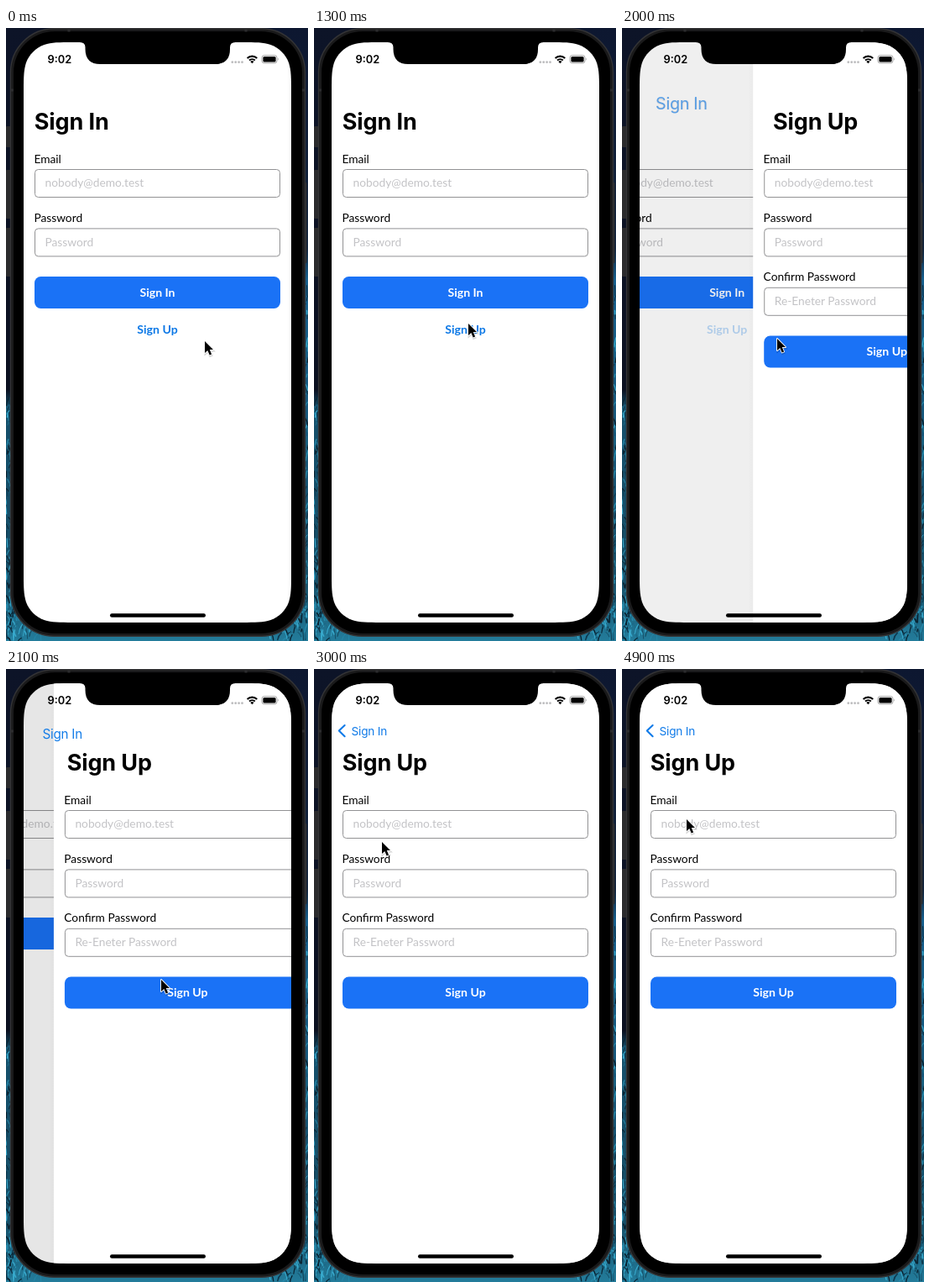
An HTML page for the animation above (5000 ms loop, 360 by 730 pixels).

```html
<!DOCTYPE html>
<html lang="en">
<head>
<meta charset="utf-8">
<title>Sign in flow</title>
<style>
  html, body { margin: 0; width: 100%; height: 100%; overflow: hidden; background: #0b1220; }
  svg { display: block; width: 100%; height: 100%; }
  .label, .hint { font: 400 13.75px Lato, sans-serif; }
  .hint { fill: #c3c3c6; }
  .action { font: 700 14.1px Lato, sans-serif; text-anchor: middle; }
  .title { font: 700 27px Inter, sans-serif; letter-spacing: -.12px; }
  .back { font: 400 13.6px Inter, sans-serif; letter-spacing: -.2px; fill: #0f7ae8; }
  .clock { font: 600 12.8px Inter, sans-serif; }
</style>
</head>
<body>
<svg viewBox="0 0 360 730">
  <defs>
    <linearGradient id="leftSky" x2="0" y2="1">
      <stop offset="0" stop-color="#0d1428"/>
      <stop offset=".59" stop-color="#0b1020"/>
      <stop offset=".62" stop-color="#154f6b"/>
      <stop offset=".9" stop-color="#164f68"/>
      <stop offset="1" stop-color="#237c9b"/>
    </linearGradient>
    <linearGradient id="rightSky" x2="0" y2="1">
      <stop offset="0" stop-color="#0d1730"/>
      <stop offset=".36" stop-color="#10243f"/>
      <stop offset=".41" stop-color="#16608f"/>
      <stop offset=".9" stop-color="#164f68"/>
      <stop offset="1" stop-color="#237c9b"/>
    </linearGradient>
    <linearGradient id="edgeShade">
      <stop offset="0" stop-opacity="0"/>
      <stop offset="1" stop-opacity=".02"/>
    </linearGradient>
    <clipPath id="glass"><path id="glassShape"/></clipPath>
  </defs>

  <rect width="180" height="730" fill="url(#leftSky)"/>
  <rect x="180" width="180" height="730" fill="url(#rightSky)"/>
  <g id="grass" fill="none" stroke-linecap="round"/>

  <g fill="#2b2b2d">
    <rect x="0" y="117" width="8" height="25" rx="1"/>
    <rect x="0" y="169" width="8" height="58" rx="1"/>
    <rect x="0" y="238" width="8" height="58" rx="1"/>
    <rect x="354" y="184" width="4.5" height="96" rx="1"/>
  </g>
  <rect x="5.5" y=".8" width="351" height="723.5" rx="52" fill="#1a1a1b" stroke="#343436" stroke-width="1.4"/>
  <rect x="9" y="4" width="344" height="717" rx="49"/>
  <path d="M6 74h3M353 74h3M75 1.500v3M286 1.500v3" stroke="#2c2c2e" stroke-width="3"/>

  <g clip-path="url(#glass)">
    <rect x="21" y="17" width="319" height="691" fill="#fff"/>
    <g id="signIn"></g>
    <rect id="dim" x="21" y="17" width="319" height="691"/>
    <g id="signUp">
      <rect x="15" y="17" width="6" height="691" fill="url(#edgeShade)"/>
      <rect x="21" y="17" width="325" height="691" fill="#fff"/>
    </g>
    <text id="newTitle" class="title" x="33.8" y="121">Sign Up</text>
    <text id="oldTitle" class="title">Sign In</text>
    <text id="back" class="back">Sign In</text>
    <path id="chevron" d="M36.6 67l-6.8 6.6 6.8 6.6" fill="none" stroke="#0f7ae8" stroke-width="2.1" stroke-linecap="round" stroke-linejoin="round"/>

    <text class="clock" x="49.5" y="42">9:02</text>
    <g fill="#bdbdbf">
      <circle cx="269.8" cy="40.7" r="1.4"/><circle cx="273.7" cy="40.7" r="1.4"/>
      <circle cx="277.6" cy="40.7" r="1.4"/><circle cx="281.5" cy="40.7" r="1.4"/>
    </g>
    <g fill="none" stroke="#000" stroke-width="2.1">
      <path d="M287.6 36a8.2 8.2 0 0 1 11.6 0M290 38.6a4.9 4.9 0 0 1 6.8 0"/>
      <path d="M293.4 42.2l-2.1-2.1a3 3 0 0 1 4.2 0z" fill="#000" stroke="none"/>
    </g>
    <rect x="305" y="32.6" width="18" height="9.2" rx="2.7" fill="none" stroke="#9c9c9c" stroke-width=".9"/>
    <rect x="306.4" y="34" width="15.2" height="6.4" rx="1.5"/>
    <path d="M324.2 35.6q1.6 1.6 0 3.2z" fill="#9c9c9c"/>
    <rect x="124" y="697.3" width="114" height="4.4" rx="2.2"/>
  </g>
  <path d="M88 16v1q6.500 0 6.500 6v2q0 18 18 18H249q18 0 18-18v-2q0-6 6.500-6v-1z"/>

  <g id="cursor">
    <path d="M.5 1.500V15.500L3.800 12.500 6.100 18 8.500 17 6.200 11.600H10.500Z" opacity=".16" stroke="#000" stroke-width="2"/>
    <path d="M0 0V14L3.300 11 5.700 16.500 8.100 15.500 5.800 10.100H10Z" stroke="#fff" stroke-width="1.8" paint-order="stroke" stroke-linejoin="round"/>
  </g>
</svg>
<script>
const LOOP = 5000, STEP = 100;
const $ = id => document.getElementById(id);
const clamp = v => Math.min(1, Math.max(0, v));
const lerp = (a, b, p) => a + (b - a) * p;
const smooth = p => p * p * (3 - 2 * p);

function add(parent, tag, attrs, text) {
  const el = document.createElementNS('http://www.w3.org/2000/svg', tag);
  for (const k in attrs) el.setAttribute(k, attrs[k]);
  if (text) el.textContent = text;
  return parent.appendChild(el);
}

// Rectangle whose corners ease gradually into the sides
function softRect(x, y, w, h, r) {
  const half = [[0, 1.529], [0, 1.088], [0, .868], [.075, .631], [.169, .373]];
  const corner = [...half, ...half.slice().reverse().map(([a, b]) => [b, a])];
  const side = (right, low) => {
    const pts = corner.map(([a, b]) =>
      `${right ? x + w - a * r : x + a * r} ${low ? y + h - b * r : y + b * r}`);
    if (right !== low) pts.reverse();
    return `${pts[0]}C${pts.slice(1).join(' ')}`;
  };
  return `M${side(false, false)}L${side(true, false)}L${side(true, true)}L${side(false, true)}Z`;
}
$('glassShape').setAttribute('d', softRect(21, 17, 319, 691, 38.7));

function field(parent, y, label, hint) {
  add(parent, 'text', { class: 'label', x: 33.4, y: y - 7.4 }, label);
  add(parent, 'rect', { x: 34.5, y: y + .5, width: 292, height: 33, rx: 4, fill: '#fff', stroke: '#929294' });
  add(parent, 'text', { class: 'hint', x: 46.5, y: y + 21.4 }, hint);
}

function button(parent, y, text) {
  add(parent, 'rect', { x: 34, y, width: 293, height: 38, rx: 7.5, fill: '#1a72f6' });
  add(parent, 'text', { class: 'action', x: 180.5, y: y + 23.8, fill: '#fff' }, text);
}

function fields(parent, list) {
  list.forEach(([label, hint], i) => field(parent, 168 + i * 70.4, label, hint));
}

const base = [['Email', 'nobody@demo.test'], ['Password', 'Password']];
const signIn = $('signIn'), signUp = $('signUp');
fields(signIn, base);
button(signIn, 296, 'Sign In');
const link = add(signIn, 'text', { class: 'action', x: 180.5, y: 364, fill: '#0c78e6' }, 'Sign Up');
fields(signUp, [...base, ['Confirm Password', 'Re-Eneter Password']]);
button(signUp, 366.5, 'Sign Up');

// Wallpaper blades that show around the phone
let seed = 11;
const rnd = () => (seed = (seed * 16807) % 2147483647) / 2147483647;
const tints = ['#0a2230', '#0f3a50', '#2689aa', '#38a9cc', '#1c6a88'];
for (let i = 0; i < 420; i++) {
  const right = rnd() < .5, low = rnd() < .45;
  const depth = low ? rnd() * 45 : rnd() * 9;
  const x = right ? 360 - depth : depth;
  const y = low ? 680 + rnd() * 50 : lerp(right ? 300 : 448, 730, rnd());
  const dx = rnd() * 10 - 5, dy = -3 - rnd() * 9;
  add($('grass'), 'path', {
    d: `M${x} ${y}q${dx * .2} ${dy * .6} ${dx} ${dy}`,
    stroke: tints[Math.floor(rnd() * tints.length)],
    'stroke-width': .6 + rnd() * 1.2
  });
}

// time, x, y
const path = [
  [0, 237, 373], [300, 237, 373], [1100, 184, 352], [1300, 184, 352],
  [1700, 185, 370], [2100, 185, 370], [2400, 82, 208], [3000, 81, 206],
  [3600, 79, 200], [3800, 79, 192], [4300, 76.5, 179.5], [4900, 77, 179]
];

function pointer(t) {
  const i = path.findIndex(k => k[0] > t);
  if (i < 0) return path[path.length - 1].slice(1);
  const [a, b] = [path[i - 1], path[i]];
  const p = smooth((t - a[0]) / (b[0] - a[0]));
  return [lerp(a[1], b[1], p), lerp(a[2], b[2], p)];
}

// Critically damped push transition
function push(t) {
  const s = Math.max(0, t - 1892.8) / 1000 * 18.05;
  return 1 - (1 + s) * Math.exp(-s);
}

const move = (el, x, y, scale = 1) =>
  el.setAttribute('transform', `translate(${x} ${y}) scale(${scale})`);
const fade = (el, v) => el.setAttribute('opacity', clamp(v));

function render(t) {
  const p = push(t);
  move(signIn, -96 * p, 0);
  move(signUp, 319 * (1 - p), 0);
  fade($('dim'), .112 * p);
  fade(link, 1 - .72 * clamp((t - 1600) / 200));

  // The large title shrinks into the back label
  const x = lerp(33.8, 44.6, p), y = lerp(121, 78.5, p);
  move($('oldTitle'), x, y, lerp(1, .483, p));
  move($('back'), x, y, lerp(2.07, 1, p));
  fade($('oldTitle'), 1 - 1.6 * p);
  fade($('back'), p * 1.1);
  fade($('chevron'), (p - .9) * 10);
  move($('newTitle'), 345 * (1 - p), 0);
  move($('cursor'), ...pointer(t));
}

const start = performance.now();
function tick() {
  const t = (performance.now() - start) % LOOP;
  render(Math.floor(t / STEP) * STEP);
  requestAnimationFrame(tick);
}
tick();
</script>
</body>
</html>
```
